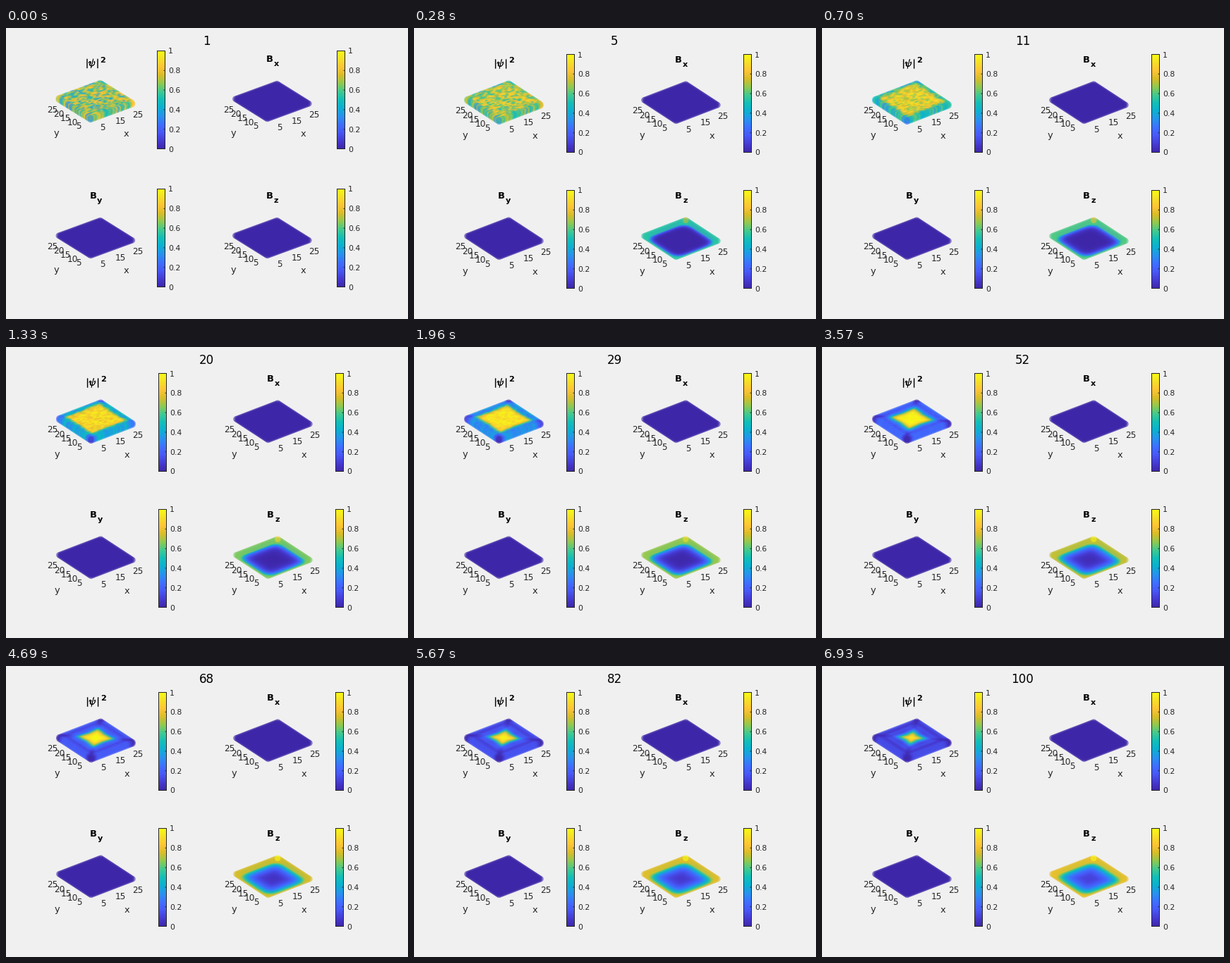
These frames come from a looping animation (570 by 413 pixels, 7 s). A matplotlib script:

```python
import numpy as np
import matplotlib.pyplot as plt
from matplotlib.animation import FuncAnimation
from matplotlib.colors import LinearSegmentedColormap
from matplotlib.patheffects import withStroke

W, H, DPI = 570, 413, 100
FRAMES, STEP = 100, 70
N = 25
PT = 72 / DPI
INK = "#262626"

PARULA = LinearSegmentedColormap.from_list("parula_like", [
    (0.00, (.242, .150, .660)), (0.08, (.272, .226, .820)),
    (0.167, (.281, .345, .965)), (0.25, (.244, .436, .999)),
    (0.333, (.160, .570, .935)), (0.42, (.050, .690, .825)),
    (0.50, (.070, .746, .726)), (0.583, (.250, .790, .570)),
    (0.667, (.560, .790, .320)), (0.75, (.850, .740, .160)),
    (0.833, (.995, .770, .210)), (0.917, (.965, .875, .155)),
    (1.00, (.977, .984, .080))])

# The opening picture is laid out slightly tighter than the rest.
FIRST = dict(front=(120, 128.9), squash=.955, step=(250.5, 194),
             bar=(214, 32), bar_step=(255, 196))
REST = dict(front=(120.6, 131.8), squash=1, step=(251, 193),
            bar=(216, 37), bar_step=(251, 193))

# Lattice, with distances from its centre scaled to 0..1
I, J = (g.ravel() for g in np.meshgrid(np.arange(N), np.arange(N), indexing="ij"))
U, V = np.abs(I - 12) / 12, np.abs(J - 12) / 12
A, B = np.maximum(U, V), np.minimum(U, V)
ROUND = np.minimum(1, (U ** 5 + V ** 5) ** .2)
DIAG = np.exp(-((A - B) / .12) ** 2)
CORNER = np.exp(-((1 - A) ** 2 + (1 - B) ** 2) / .025)
NOISE = np.random.default_rng(4).random(N * N) ** 2
BACK_FIRST = np.argsort(-(.94 * I + 1.23 * J), kind="stable")


def density(n):
    """A shrinking bright core inside a darkening rim."""
    s = n / (FRAMES - 1)
    size = 1.03 * np.exp(-.0114 * n)
    rim = .08 + .72 * np.exp(-n / 30)
    top = 1 - .14 * np.exp(-n / 15)
    dark = .75 * (1 - np.exp(-(n / 45) ** 2))
    spot = .8 * (1 - np.exp(-(n / 20) ** 2))
    rough = .55 * np.exp(-n / 20)
    r = A + .22 * s * (A - B)
    core = 1 / (1 + np.exp((r - size) / (.03 + .07 * s)))
    edge = rim * (1 - dark * DIAG) * (1 - spot * CORNER)
    edge = edge * (1 + .3 * s * np.cos(20 * (1 - A)))
    return np.clip(edge + (top - edge) * core - rough * NOISE, 0, 1)


def field_z(n):
    """A field that soaks in from the border, deeper with time."""
    edge = .46 * n ** .115 if n else 0
    depth = .01 + .036 * np.sqrt(n)
    b = edge * np.cosh(ROUND / depth) / np.cosh(1 / depth)
    b[-1] = min(1, 1.35 * edge)
    return b


fig = plt.figure(figsize=(W / DPI, H / DPI), dpi=DPI, facecolor="#f0f0f0")
ax = fig.add_axes([0, 0, 1, 1])
ax.set_xlim(0, W)
ax.set_ylim(H, 0)
ax.axis("off")


def write(x, y, s, px, **kw):
    """Text on baseline y, with its size in pixels."""
    kw = {"ha": "center", "va": "baseline", "color": INK,
          "family": "DejaVu Sans", **kw}
    return ax.text(x, y, s, fontsize=px * PT, **kw)


def line(xs, ys, color=INK, px=1):
    return ax.plot(xs, ys, color=color, lw=px * PT, snap=False, zorder=3)[0]


def project(i, j, front, squash):
    return (front[0] + 2.45 * i - 1.88 * j,
            front[1] - squash * (.94 * i + 1.23 * j))


def slab(front, squash, order, lifts):
    x, y = project(I[order], J[order], front, squash)
    xs = np.tile(x, len(lifts))
    ys = np.concatenate([y - d for d in lifts])
    return ax.scatter(xs, ys, s=(8.6 * PT) ** 2, c=np.zeros(len(xs)), cmap=PARULA,
                      vmin=0, vmax=1, linewidths=0, alpha=.6)


def axis_labels(front, squash):
    parts = [write(front[0] + 50.7, front[1] + 25.5, "x", 13),
             write(front[0] - 48.2, front[1] + 24.4, "y", 13)]
    for value in (5, 15, 25):
        x, y = project(value - 1, 0, front, squash)
        parts.append(write(x + 7.6, y + 19.7, str(value), 12.1))
    for value in range(5, 26, 5):
        x, y = project(0, value - 1, front, squash)
        parts.append(write(x - 9.2, y + 19.2, str(value), 12.1))
    return parts


def colorbar(x, top):
    w, h = 12, 140
    ramp = np.linspace(1, 0, 256)[:, None]
    parts = [ax.imshow(ramp, cmap=PARULA, vmin=0, vmax=1, aspect="auto",
                       extent=(x, x + w, top + h, top), zorder=2)]
    left, right, up, low = x + .5, x + w - .5, top + .5, top + h - .5
    parts.append(line([left, right, right, left, left], [up, up, low, low, up]))
    for k in range(6):
        y = low + (up - low) * k / 5
        parts.append(line([right - 1.5, right], [y, y]))
        parts.append(write(x + 16, y + 4, f"{k / 5:g}", 10.9, ha="left"))
    return parts


def title_psi(x, y):
    bars = [line([x + d, x + d], [y - 6, y + 6], "k", 1.4) for d in (-11.5, 3.5)]
    return bars + [
        write(x - 4, y + 3.5, r"$\psi$", 14.5, color="k", math_fontfamily="cm",
              path_effects=[withStroke(linewidth=.4, foreground="k")]),
        write(x + 10.6, y - 1.8, "2", 11.2, color="k", weight="bold")]


def title_b(x, y, sub):
    return [write(x, y, "B", 13, color="k", weight="bold"),
            write(x + 9.5, y + 6, sub, 11.2, color="k", weight="bold")]


def build(front, squash, step, bar, bar_step):
    parts, slabs = [], []
    for k, name in enumerate(["psi", "x", "y", "z"]):
        row, col = divmod(k, 2)
        at = front[0] + col * step[0], front[1] + row * step[1]
        top = project(N - 1, N - 1, at, squash)[1]
        order = BACK_FIRST[::-1] if name == "z" else BACK_FIRST
        slabs.append(slab(at, squash, order, (-1, 1) if k == 0 else (0,)))
        parts += axis_labels(at, squash)
        if k == 0:
            parts += title_psi(at[0] + 6.5, top - 28.7)
        else:
            parts += title_b(at[0] + 3.2, top - 30.9, name)
        parts += colorbar(bar[0] + col * bar_step[0], bar[1] + row * bar_step[1])
    return parts + slabs, slabs


scenes = [build(**FIRST), build(**REST)]
counter = write(284.5, 23.5, "1", 16.8, color="k")


def update(n):
    current = min(n, 1)
    for k, (parts, _) in enumerate(scenes):
        for part in parts:
            part.set_visible(k == current)
    slabs = scenes[current][1]
    slabs[0].set_array(np.tile(density(n)[BACK_FIRST], 2))
    slabs[3].set_array(field_z(n)[BACK_FIRST[::-1]])
    counter.set_text(str(n + 1))
    return []


anim = FuncAnimation(fig, update, frames=FRAMES, interval=STEP,
                     init_func=lambda: update(0), repeat=True, repeat_delay=0)
plt.show()
```
